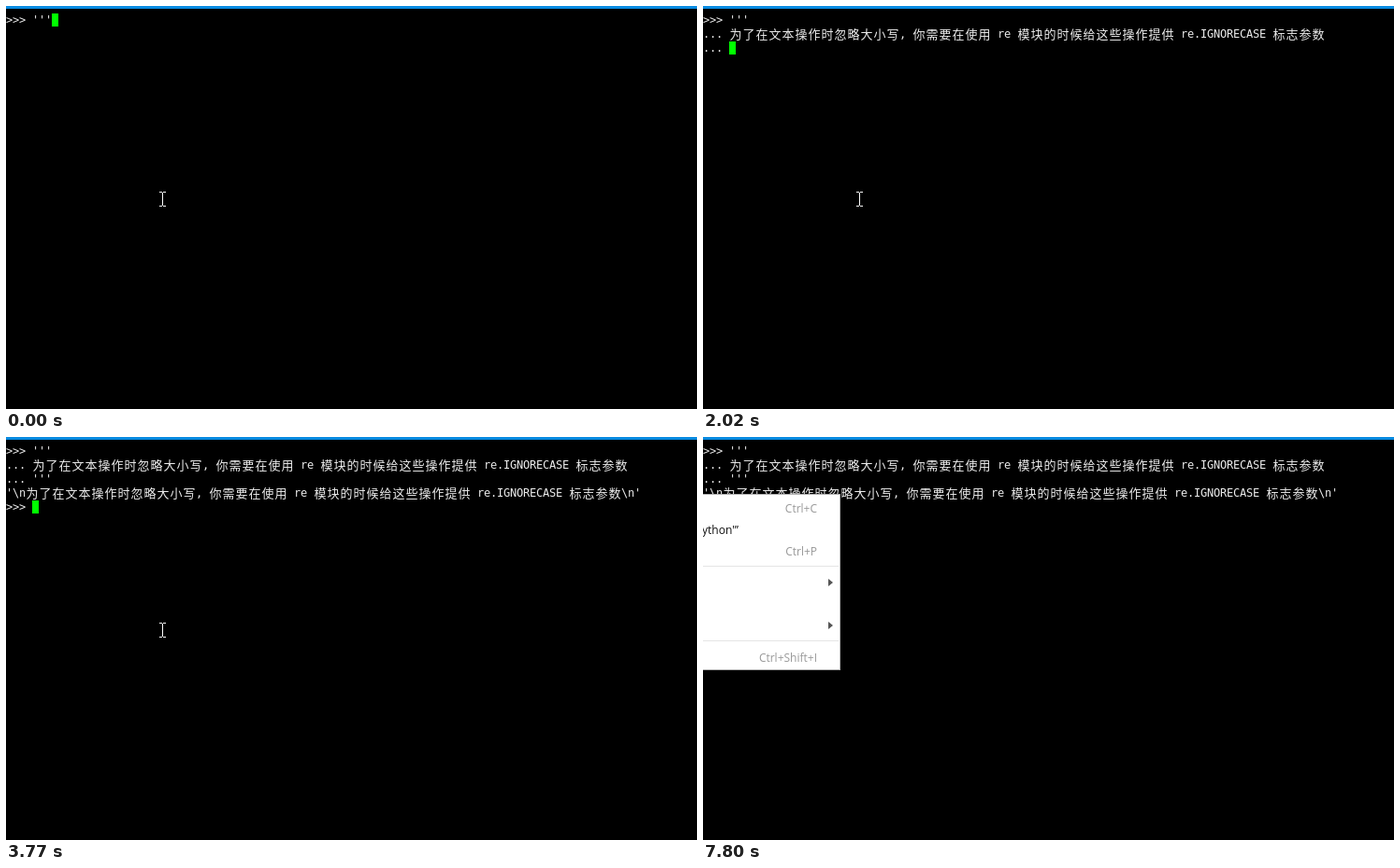
An HTML page with a canvas for the animation above (8000 ms loop, 739 px wide and 432 px high).

```html
<!DOCTYPE html>
<html lang="zh-CN">
<head>
<meta charset="utf-8">
<title>Python prompt</title>
<style>
html, body { margin: 0; width: 100%; height: 100%; overflow: hidden; background: #000; }
canvas { display: block; }
</style>
</head>
<body>
<canvas id="stage" width="739" height="432"></canvas>
<script>
const ctx = document.getElementById('stage').getContext('2d');
const LOOP = 8000, CELL = 7, LINE = 15, TOP = 8;
const LATIN = '12px "DejaVu Sans Mono", monospace';
const HAN = '13px "Noto Sans CJK SC", "Noto Sans CJK", sans-serif';
const MENU = '12px "Open Sans", "Noto Sans", sans-serif';
const GREEN = '#00ff00';

const note = '为了在文本操作时忽略大小写, 你需要在使用 re 模块的时候给这些操作提供 re.IGNORECASE 标志参数';
const opening = ">>> '''";
const body = '... ' + note;
const result = [opening, body, "... '''", "'\\n" + note + "\\n'", '>>> '];

// Terminal contents from each moment on; the cursor follows the last line.
const screens = [
  [0, [opening]],
  [500, [opening, '... ']],
  [1490, [opening, body]],
  [2020, [opening, body, '... ']],
  [2920, [opening, body, "... '"]],
  [3070, [opening, body, "... ''"]],
  [3340, [opening, body, "... '''"]],
  [3770, result]
];

function rect(color, x, y, w, h) {
  ctx.fillStyle = color;
  ctx.fillRect(x, y, w, h);
}

// Draws one line on the character grid and returns its end.
function drawLine(text, row) {
  const top = TOP + row * LINE;
  let x = 0;
  ctx.fillStyle = '#ececec';
  ctx.textAlign = 'left';
  for (const ch of text) {
    const wide = ch > '\u2e7f';
    ctx.font = wide ? HAN : LATIN;
    ctx.fillText(ch, wide ? x + 0.5 : x, top + (wide ? 12 : 11));
    x += wide ? CELL * 2 : CELL;
  }
  return x;
}

function drawCursor(x, row, hollow) {
  const y = TOP + row * LINE;
  if (hollow) {
    ctx.strokeStyle = GREEN;
    ctx.lineWidth = 1;
    ctx.strokeRect(x + 0.5, y + 0.5, 6, 13);
  } else {
    rect(GREEN, x, y, 7, 14);
  }
}

function drawPointer(x, y) {
  const c = '#fff';
  rect(c, x, y - 7, 1, 14);
  for (const edge of [y - 8, y + 7]) {
    rect(c, x - 3, edge, 3, 1);
    rect(c, x + 1, edge, 3, 1);
  }
}

function label(text, x, y, color) {
  ctx.font = MENU;
  ctx.textAlign = 'right';
  ctx.fillStyle = color;
  ctx.fillText(text, x, y);
}

function drawMenu() {
  rect('#b4b4b4', 0, 61, 147, 189);
  rect('#fff', 0, 62, 146, 187);
  label('Ctrl+C', 122, 81, '#999');
  label('ython\'”', 38, 104, '#111');
  label('Ctrl+P', 122, 127, '#999');
  label('Ctrl+Shift+I', 122, 241, '#999');
  for (const y of [138, 218]) rect('#e5e5e5', 0, y, 145, 1);
  ctx.fillStyle = '#555';
  for (const y of [156, 202]) {
    ctx.beginPath();
    ctx.moveTo(134, y - 4);
    ctx.lineTo(139, y);
    ctx.lineTo(134, y + 4);
    ctx.fill();
  }
}

function draw(t) {
  rect('#000', 0, 0, 739, 432);
  rect('#088ae0', 0, 0, 739, 3);

  const lines = screens.filter(s => s[0] <= t).pop()[1];
  let end = 0;
  lines.forEach((text, row) => { end = drawLine(text, row); });
  drawCursor(end, lines.length - 1, t >= 6120);

  if (t < 4480) drawPointer(167, 207);
  else if (t < 4600) drawPointer(113, 182);

  if (t >= 7800) drawMenu();
}

function tick() {
  draw(performance.now() % LOOP);
  requestAnimationFrame(tick);
}
tick();
</script>
</body>
</html>
```
